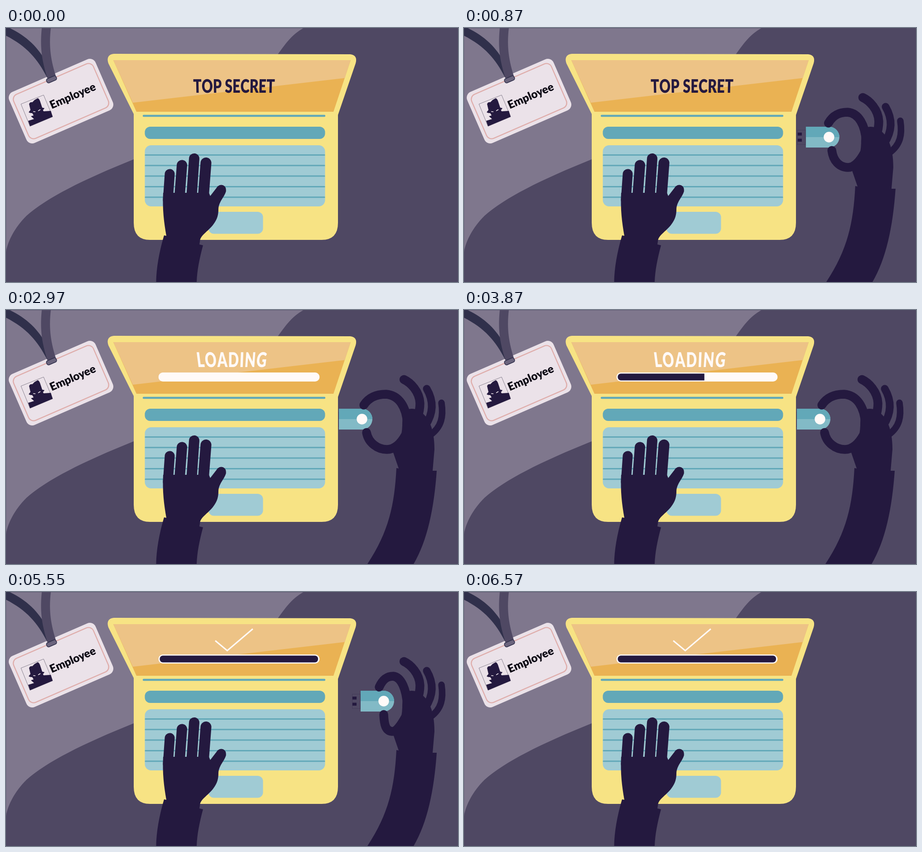
An HTML page with a canvas for the animation above (6600 ms loop, 998x561 px).

```html
<!DOCTYPE html>
<html lang="en">
<head>
<meta charset="utf-8">
<title>Top secret</title>
<style>
html, body { margin: 0; width: 100%; height: 100%; overflow: hidden; background: #4f4863; }
canvas { display: block; width: 998px; height: 561px; }
</style>
</head>
<body>
<canvas id="stage" width="998" height="561"></canvas>
<script>
const ctx = document.getElementById('stage').getContext('2d');
const LOOP = 6600;
const C = {
  wall: '#7f778d', desk: '#4f4863', ink: '#24193f', strap: '#30304b',
  card: '#ebe2e9', pink: '#dfaeac', yellow: '#f7e384', amber: '#eab253',
  sand: '#edc386', teal: '#62a8b8', mist: '#a0cbd4', usb: '#82bac6', white: '#fffaf8'
};

const clamp = v => Math.max(0, Math.min(1, v));
const span = (t, a, b) => clamp((t - a) / (b - a));
const smooth = u => u * u * (3 - 2 * u);

function fill(d, color) {
  ctx.fillStyle = color;
  ctx.fill(new Path2D(d));
}

function line(d, color, width, cap = 'round') {
  ctx.strokeStyle = color;
  ctx.lineWidth = width;
  ctx.lineCap = cap;
  ctx.lineJoin = cap === 'round' ? 'round' : 'miter';
  ctx.stroke(new Path2D(d));
}

function box(x, y, w, h, r, color) {
  ctx.fillStyle = color;
  ctx.beginPath();
  ctx.roundRect(x, y, w, h, r);
  ctx.fill();
}

function frame(x, y, w, h, r, color, width) {
  ctx.strokeStyle = color;
  ctx.lineWidth = width;
  ctx.beginPath();
  ctx.roundRect(x, y, w, h, r);
  ctx.stroke();
}

function dot(x, y, r, color) {
  ctx.fillStyle = color;
  ctx.beginPath();
  ctx.arc(x, y, r, 0, 7);
  ctx.fill();
}

function drawRoom() {
  ctx.fillStyle = C.wall;
  ctx.fillRect(0, 0, 998, 561);
  fill('M657 0C630 15 615 38 601 57C540 150 500 205 282 290C170 335 90 375 45 415C20 440 4 470 0 495V561H998V0Z', C.desk);
  frame(0.5, 0.5, 997, 560, 0, 'rgba(70,66,92,.5)', 1);
}

function drawBadge() {
  ctx.save();
  ctx.translate(121.5, 161.5);
  ctx.rotate(-0.41);
  box(-104, -61.5, 208, 123, 14, C.card);
  frame(-96, -53, 192, 106, 12, C.pink, 2.4);
  ctx.restore();

  fill('M0 0H8C45 18 72 42 92 82L102 108L91 110C70 68 45 40 0 17Z', C.strap);
  fill('M79 0H99C95 35 97 65 110 106L92 112C78 70 75 40 79 0Z', C.desk);
  ctx.save();
  ctx.translate(100.5, 113.5);
  ctx.rotate(-0.41);
  box(-11.5, -5, 23, 10, 4, '#6b647d');
  frame(-11.5, -5, 23, 10, 4, C.strap, 1.6);
  ctx.restore();

  line('M33 168L83 148L103 196L53 217Z', '#6d6675', 0.8, 'butt');
  fill('M51 168Q53 163 58 164L63 159L70 155Q73 156 75 161L80 176L85 177Q82 184 68 186Q54 190 50 186L54 181Z', C.ink);
  fill('M56 185L80 178L83 184L99 183L103 196L53 217L49 205L62 201L55 195L61 193Z', C.ink);
  line('M60 184.5L65 185M71 183L76 180', C.card, 1.6, 'butt');

  ctx.save();
  ctx.translate(101, 179);
  ctx.rotate(-0.41);
  ctx.font = '900 24.5px Lato, sans-serif';
  ctx.textAlign = 'left';
  ctx.fillStyle = '#0b0814';
  ctx.fillText('Employee', 0, 0);
  ctx.restore();
}

// Centred line of letters that fan out like the lid.
function screenText(text, y, size, squeeze, track, fan, color) {
  ctx.font = `900 ${size}px Lato, sans-serif`;
  ctx.textAlign = 'center';
  ctx.fillStyle = color;
  const widths = [...text].map(ch => ctx.measureText(ch).width * squeeze + track);
  let x = 503.5 - (widths.reduce((a, b) => a + b, 0) - track) / 2 - (fan > 0.001 ? 5 : 0);
  [...text].forEach((ch, i) => {
    const mid = x + (widths[i] - track) / 2;
    ctx.save();
    ctx.transform(squeeze, 0, -(mid - 499) * fan, 1, mid, y);
    ctx.fillText(ch, 0, 0);
    ctx.restore();
    x += widths[i];
  });
}

function drawLoading(t) {
  const white = span(t, 1620, 2900);
  const dark = span(t, 3000, 4590);
  const inset = 4 * white;
  ctx.globalAlpha = span(t, 1170, 1320);

  if (dark < 1) screenText('LOADING', 126, 45, 0.695, span(t, 1200, 4590) * 2, 0.0019, C.white);

  frame(334 + inset, 139.5, 361 - 2 * inset, 17, 9, C.white, 2.8);
  ctx.globalAlpha = 1;
  ctx.save();
  ctx.beginPath();
  ctx.roundRect(337, 138.5, 354, 19, 9);
  ctx.clip();
  ctx.fillStyle = C.white;
  ctx.fillRect(337, 138, 354 * white, 20);
  ctx.restore();
  if (dark > 0) {
    ctx.save();
    ctx.beginPath();
    ctx.rect(339, 138, 350 * dark, 20);
    ctx.clip();
    box(339.5, 140.5, 349.5, 15, 7, C.ink);
    ctx.restore();
  }

  const tick = span(t, 4600, 4970) * 108.5;
  if (tick > 0) {
    ctx.setLineDash([tick, 400]);
    line('M462 107.5L488.5 129.5L545.5 81', C.white, 3, 'butt');
    ctx.setLineDash([]);
  }
}

function drawLaptop(t) {
  fill('M238 57L760 58Q777 60 772 78L733 192V430Q733 468 697 468H318Q282 468 282 430V190L226 78Q220 59 238 57Z', C.yellow);
  fill('M237 71H761L723 185H288Z', C.amber);
  fill('M237 71H761L748 110.5L280 165Z', C.sand);
  line('M304 194H703', C.teal, 4.4);
  box(306.5, 218, 398, 27, 12, C.teal);
  box(306.5, 259, 398, 135, 14, C.mist);
  for (let i = 0; i < 5; i++) line(`M308 ${280.5 + i * 23.3}H703`, C.teal, 3);
  box(447, 406, 120.5, 48.5, 12, C.mist);

  if (t < 1170) screenText('TOP SECRET', 143, 41, 0.74, t * 0.00025, 0.0003, C.ink);
  else drawLoading(t);
}

function drawLeftHand() {
  line('M361.5 322.5L357.5 380', C.ink, 22);
  line('M388.5 303L383 376', C.ink, 23);
  line('M415.5 288.5L409.5 376', C.ink, 23);
  line('M441.5 298L435.5 376', C.ink, 24);
  fill('M347 364H448L451 371L468 349L486 359C484 372 470 382 469 400C469 412 467 422 457 435C445 450 432 456 428.5 468L427 478L435 480C427 510 422 535 421 561H331.5C332 530 338 495 349 458L354 459C349 430 345 400 347 364Z', C.ink);
  dot(475.3, 357, 10.5, C.ink);
}

function drawUsb(x) {
  ctx.fillStyle = C.desk;
  ctx.fillRect(x - 19, 225, 19, 33);
  frame(x - 18.5, 225.5, 18, 32, 0, 'rgba(36,25,63,.3)', 0.8);
  ctx.fillStyle = C.ink;
  ctx.fillRect(x - 18, 231, 9, 6.5);
  ctx.fillRect(x - 18, 244.5, 9, 6.5);
  box(x, 218, 74, 46, [0, 23, 23, 0], C.usb);
  ctx.save();
  ctx.beginPath();
  ctx.rect(x, 218, 74, 23);
  ctx.clip();
  box(x, 218, 74, 46, [0, 23, 23, 0], C.teal);
  ctx.restore();
  dot(x + 51, 241, 11.7, C.white);
}

// k bends index and thumb towards the palm.
function drawRightHand(k) {
  const b = (x, by) => x + by * k;
  line(`M${b(790, 34)} 210C${b(803, 30)} 190 ${b(822, 22)} 186 ${b(839, 16)} 186C${b(868, 5)} 188 884 215 886 250`, C.ink, 19.5);
  line(`M${b(796, 38)} 270.5C${b(800, 35)} 293 ${b(820, 18)} 308 ${b(841, 13)} 308C${b(858, 4)} 308 872 294 882 276`, C.ink, 19.5);
  line('M878.5 153.5C893 160 913 180 914 206Q914 222 908 240', C.ink, 19.5);
  line('M929 174C943 198 946 225 926 255', C.ink, 17);
  line('M961.5 205C966 235 962 258 937 276', C.ink, 14.5);
  fill('M875 255C875 230 882 218 896 218C910 218 924 228 934 246C943 264 946 285 946 308L942 355L951 355C945 440 930 510 900 561L880 600H772L798 561C845 490 858 430 862 349L867 350L854 312C868 300 874 280 875 255Z', C.ink);
}

function handPose(t) {
  if (t < 3000) {
    const k = 1 - smooth(span(t, 690, 1000));
    return { k, dx: 5 * k, dy: 430 * Math.pow(1 - span(t, 20, 640), 3) };
  }
  return {
    k: smooth(span(t, 5040, 5490)),
    dx: 0,
    dy: 430 * Math.pow(span(t, 5550, 6180), 2.4)
  };
}

function shifted(pose, draw) {
  ctx.save();
  ctx.translate(pose.dx, pose.dy);
  draw();
  ctx.restore();
}

function render(t) {
  const pose = handPose(t);
  drawRoom();
  drawBadge();
  shifted(pose, () => drawUsb(735 + 48 * pose.k));
  drawLaptop(t);
  drawLeftHand();
  shifted(pose, () => drawRightHand(pose.k));
}

const start = performance.now();
function tick(now) {
  render(Math.max(0, now - start) % LOOP);
  requestAnimationFrame(tick);
}
render(0);
requestAnimationFrame(tick);
</script>
</body>
</html>
```
